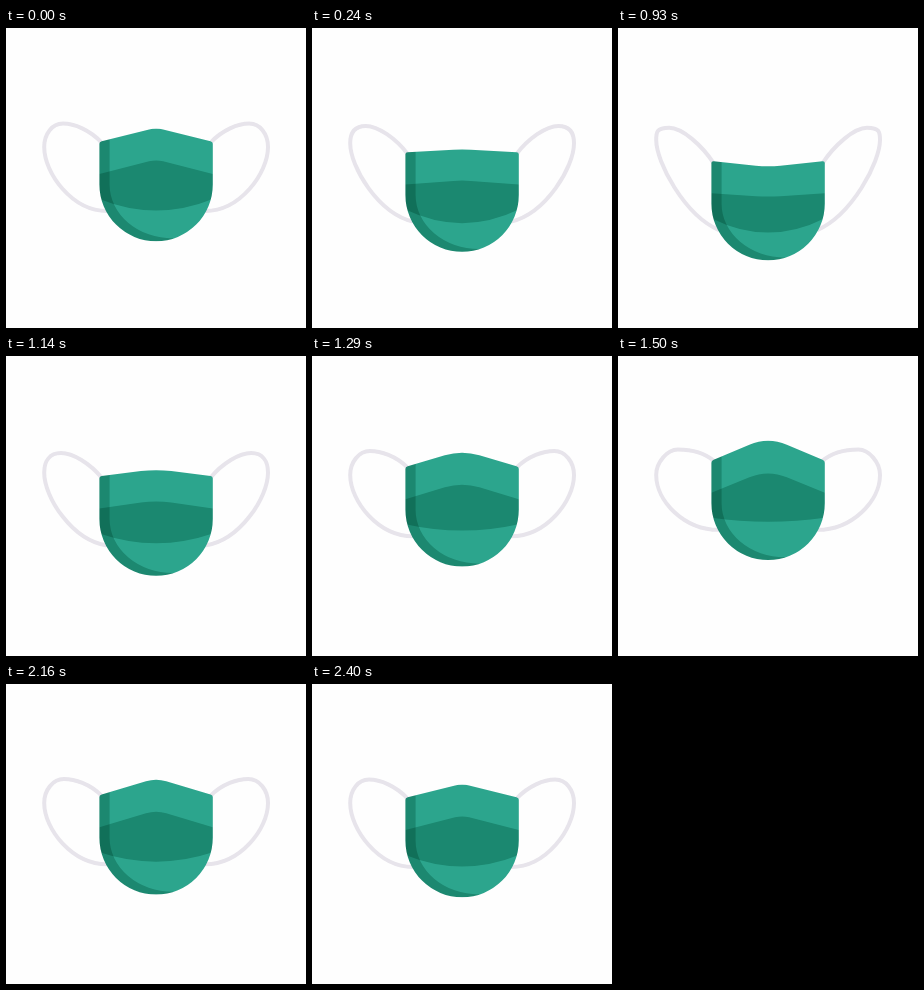
These frames come from a looping animation (300 by 300 pixels, 4.43 s). An HTML page:

```html
<!DOCTYPE html>
<html lang="en">
<head>
<meta charset="utf-8">
<title>Face mask</title>
<style>
  html, body { margin: 0; width: 100%; height: 100%; overflow: hidden; background: #fefefe; }
  svg { display: block; width: 100%; height: 100%; }
  #shade { mix-blend-mode: multiply; }
</style>
</head>
<body>
<svg viewBox="0 0 300 300">
  <defs>
    <clipPath id="clip"><path id="outline"/></clipPath>
    <path id="strap" fill="none" stroke="#e7e4eb" stroke-width="4"/>
  </defs>
  <use href="#strap"/>
  <use href="#strap" transform="translate(300.2 0) scale(-1 1)"/>
  <g id="body" clip-path="url(#clip)">
    <rect x="90" y="60" width="120" height="180" fill="#2ca58d"/>
    <path id="band" fill="#1b8870"/>
    <path id="shade" fill="#9ed2cb" d="M90 60H103.6V157A63.5 54 0 0 0 167 211V230H90Z"/>
  </g>
</svg>
<script>
const LOOP = 4430, STEP = 30;
const L = 93.4, R = 206.8, MID = 150.1;
const $ = id => document.getElementById(id);

// shift: height of the cloth, sag: curve of the lower fold, round: softness of the tips
const rest = { shift: 0, sag: 11.5, round: 7 };
const low = { shift: 25, sag: 16.5, round: 11 };
const high = { shift: -10.4, sag: 3.5, round: 19 };
const moves = [
  { from: rest, to: low, start: 0, end: 580, x1: .4, x2: .48 },
  { from: low, to: high, start: 580, end: 1680, x1: .55, x2: .45 },
  { from: high, to: rest, start: 1680, end: 2400, x1: .33, x2: .67 }
];

// Cubic bezier easing with flat ends, solved by bisection
function ease(x, x1, x2) {
  let lo = 0, hi = 1, t;
  for (let i = 0; i < 24; i++) {
    t = (lo + hi) / 2;
    const bx = 3 * t * (1 - t) * (x1 * (1 - t) + x2 * t) + t ** 3;
    if (bx < x) lo = t; else hi = t;
  }
  return t * t * (3 - 2 * t);
}

function poseAt(time) {
  const m = moves.find(m => time < m.end);
  if (!m) return rest;
  const k = ease((time - m.start) / (m.end - m.start), m.x1, m.x2);
  const mix = name => m.from[name] + (m.to[name] - m.from[name]) * k;
  return { shift: mix("shift"), sag: mix("sag"), round: mix("round") };
}

// Two straight slopes joined by a rounded tip
function ridge(side, tip, round) {
  const y = tip + (side - tip) * round / (MID - L);
  return `L${MID - round} ${y}Q${MID} ${tip} ${MID + round} ${y}`;
}

function strapPath(d) {
  const slack = Math.max(0, d);
  const topX = 57 - .3 * d, topY = 95.6 + .22 * d;
  const turn = 119 - .36 * slack, end = 183 + d;
  return `M96 ${115 + 1.08 * d}C84 ${102 + .8 * d} ${topX + 11 + .1 * d} ${topY} ${topX} ${topY}` +
    `S38.2 ${turn - 13 + .28 * slack} 38.2 ${turn}` +
    `C38.2 ${turn + 26 - .22 * slack} 66 ${end - .8 * slack} 101 ${end}`;
}

function draw({ shift, sag, round }) {
  const top = 114.3, tip = 100.2 + 1.05 * shift, edge = top + (tip - top) * .04;
  const fold = 146.5, hem = 171.5;
  $("strap").setAttribute("d", strapPath(shift));
  $("outline").setAttribute("d",
    `M${L} 157V${top + 2}Q${L} ${top} ${L + 2.3} ${edge}` + ridge(top, tip, round) +
    `L${R - 2.3} ${edge}Q${R} ${top} ${R} ${top + 2}V157A56.7 56.7 0 0 1 ${L} 157Z`);
  $("band").setAttribute("d",
    `M${L} ${fold}` + ridge(fold, 132 + .96 * shift, round) +
    `L${R} ${fold}V${hem}Q${MID} ${hem + 2 * sag} ${L} ${hem}Z`);
  $("body").setAttribute("transform", `translate(0 ${shift - .5})`);
}

const start = performance.now();
function frame(now) {
  const t = Math.max(0, now - start) % LOOP;
  draw(poseAt(Math.floor(t / STEP) * STEP));
  requestAnimationFrame(frame);
}
frame(start);
</script>
</body>
</html>
```
